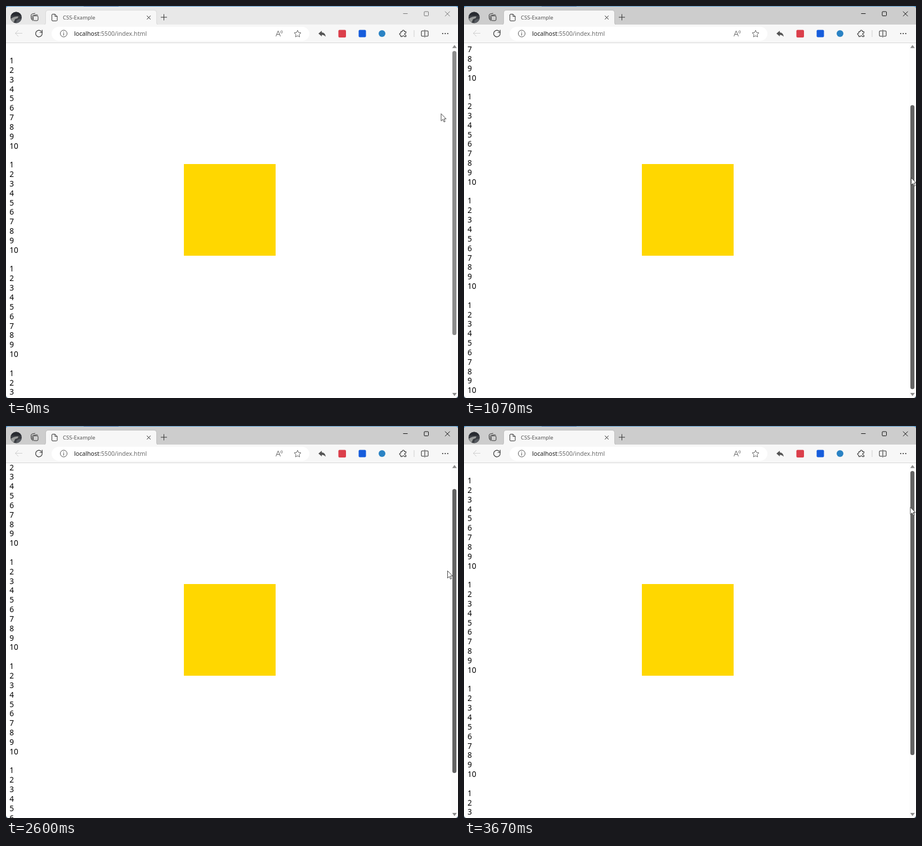
Recreate the animation shown at these times as an HTML page with a canvas. Size 803 by 697 pixels, loop 4.39 s.

```html
<!DOCTYPE html>
<html lang="en">
<head>
<meta charset="utf-8">
<title>Fixed square while scrolling</title>
<style>
  html, body { margin: 0; width: 100%; height: 100%; overflow: hidden; background: #fff; }
  canvas { display: block; width: 803px; height: 697px; }
</style>
</head>
<body>
<canvas id="stage" width="803" height="697"></canvas>
<script>
const ctx = document.getElementById('stage').getContext('2d');
const W = 803, H = 697, LOOP = 4390, STEP = 200 / 3;
const ACTIVE_STEP = 12, HOVER_STEP = 5;
const MAX_SCROLL = 121, THUMB_TRAVEL = 96.3;
const FONT = '"Noto Sans", "Open Sans", sans-serif';

// Each move eases to its goal with u ** power; times are in steps.
const pointerMoves = [
  { from: 0, to: 6, goal: [795.5, 202], power: 1 },
  { from: 11, to: 16, goal: [794, 305], power: 1 },
  { from: 16, to: 20, goal: [796, 310], power: 1 },
  { from: 21, to: 25, goal: [797, 253], power: 1.2 },
  { from: 25, to: 29, goal: [795, 146], power: 1 },
  { from: 29, to: 32, goal: [795, 140], power: 1 },
  { from: 36, to: 39, goal: [784, 257], power: 1 },
  { from: 39, to: 44, goal: [793, 313], power: 0.8 },
  { from: 46, to: 54, goal: [792.5, 144], power: 1.75 }
];
const scrollMoves = [
  { from: 12, to: 16, goal: [MAX_SCROLL], power: 0.7 },
  { from: 21.6, to: 28, goal: [0], power: 1.5 },
  { from: 37, to: 43, goal: [MAX_SCROLL], power: 1 },
  { from: 48, to: 53.5, goal: [0], power: 2 }
];

function follow(moves, origin, step) {
  return moves.reduce((pos, { from, to, goal, power }) => {
    const u = Math.min(1, Math.max(0, (step - from) / (to - from))) ** power;
    return pos.map((v, i) => v + (goal[i] - v) * u);
  }, origin);
}

function rect(x, y, w, h, fill) {
  ctx.fillStyle = fill;
  ctx.fillRect(x, y, w, h);
}

function round(x, y, w, h, r, fill, stroke, width = 1) {
  ctx.beginPath();
  ctx.roundRect(x, y, w, h, r);
  paint(fill, stroke, width);
}

function circle(x, y, r, fill, stroke, width = 1) {
  ctx.beginPath();
  ctx.arc(x, y, r, 0, Math.PI * 2);
  paint(fill, stroke, width);
}

function paint(fill, stroke, width) {
  if (fill) { ctx.fillStyle = fill; ctx.fill(); }
  if (stroke) { ctx.strokeStyle = stroke; ctx.lineWidth = width; ctx.stroke(); }
}

function shape(d, x, y, fill, stroke, width = 1) {
  ctx.save();
  ctx.translate(x, y);
  const path = new Path2D(d);
  ctx.lineJoin = 'round';
  ctx.lineWidth = width;
  if (fill) { ctx.fillStyle = fill; ctx.fill(path); }
  if (stroke) { ctx.strokeStyle = stroke; ctx.stroke(path); }
  ctx.restore();
}

function text(str, x, y, size, fill) {
  ctx.font = `${size}px ${FONT}`;
  ctx.fillStyle = fill;
  ctx.fillText(str, x, y);
  return x + ctx.measureText(str).width;
}

function drawAvatar() {
  ctx.save();
  circle(18, 20.5, 10, '#3a3d42');
  ctx.clip();
  rect(8, 10, 20, 7, '#282b31');
  shape('M-9 2Q-4 -2 4 -2L3 1L-2 3L-4 8H-7Z', 18, 20.5, '#9a9c9b');
  shape('M1 5Q5 1 10 3V10H0Z', 18, 20.5, '#565a60');
  ctx.restore();
}

function drawTitleBar(active) {
  const ink = active ? '#111' : '#777';
  rect(0, 1, W, 33, active ? '#cdcdcd' : '#e8e8e8');
  drawAvatar();

  // Stacked tabs
  round(48.5, 17.5, 8.5, 8.5, 2, null, '#333');
  shape('M2 11L0.8 9.5V3.5Q0.8 1.5 2.5 1L9 0Q10 0 10.8 1M-0.2 8.5L-1.2 6V1.5Q-1.2 -1 1 -1.5L6 -2.5',
    45.8, 15.5, null, '#333');

  ctx.shadowColor = 'rgba(0,0,0,.18)';
  ctx.shadowBlur = 2;
  shape('M66 34Q71 34 71 29V12Q71 8 75 8H263Q267 8 267 12V29Q267 34 272 34Z', 0, 0, '#f7f7f7');
  ctx.shadowColor = 'transparent';

  shape('M0 1.5Q0 0 1.5 0H5.5L9.5 4V10.5Q9.5 12 8 12H1.5Q0 12 0 10.5ZM5.5 0V4H9.5',
    81.5, 14.5, null, '#333');
  text('CSS-Example', 101, 24, 9.5, '#555');
  shape('M0 0L6.5 6.5M6.5 0L0 6.5', 250.3, 17.3, null, '#222');
  shape('M0 5.5H11M5.5 0V11', 275, 14.5, null, '#333');

  shape('M0 0H8', 705.5, 13.5, null, ink);
  round(743, 10, 7.5, 7.5, 1, null, ink);
  shape('M0 0L8.5 8.5M8.5 0L0 8.5', 780, 9.7, null, ink);
}

function drawAddressBar() {
  round(81, 37, 458, 25, 12.5, '#fff');
  circle(102.5, 49, 6, null, '#555');
  rect(102, 48, 1, 4.5, '#555');
  rect(102, 45.7, 1, 1.3, '#555');
  const x = text('localhost', 121, 53, 10.64, '#1b1b1b');
  text(':5500/index.html', x, 53, 10.64, '#6c6c6c');

  // Read aloud and favourite
  shape('M0 10.5L4 0.5L8 10.5M1.4 7H6.6', 479.5, 43.5, null, '#666');
  shape('M0 1.5Q1.7 3 0 4.8M2 0Q5 3 2 6.2', 487.5, 43, null, '#666', 0.9);
  shape('M0 -6L1.8 -2L6 -1.5L2.9 1.5L3.7 5.8L0 3.7L-3.7 5.8L-2.9 1.5L-6 -1.5L-1.8 -2Z',
    518, 49.2, null, '#666');
}

function drawToolbar() {
  rect(0, 33, W, 32, '#f7f7f7');
  rect(0, 65, W, 1, '#d6d6d6');

  // Back and reload
  shape('M13 5.5H0.5M6 0L0.5 5.5L6 11', 16, 43, null, '#cfcfcf');
  ctx.beginPath();
  ctx.arc(58.5, 49, 5.8, -0.5, Math.PI * 1.78);
  paint(null, '#333', 1.2);
  shape('M4.5 0V4.5H0', 59.7, 42.5, null, '#333', 1.2);

  drawAddressBar();

  // Extensions
  shape('M0 5L6 0V3Q12 3 13 10.5Q10 7.3 6 7.3V10Z', 555, 44, '#555');
  round(590.5, 42.5, 13.5, 13.5, 2, '#db3f4b');
  round(626.5, 42.5, 13, 13, 2, '#175ddc');
  circle(668, 49, 6, '#2b83c4');
  shape('M1.5 2.5H4Q3.6 0 5.8 0Q8 0 7.6 2.5H10.5V5.2Q8.2 5 8.2 7Q8.2 9 10.5 8.7V11.5H7.6Q7.5 9.7 5.8 9.7Q4.1 9.7 4 11.5H1.5V8.7Q-0.8 9 -0.8 7Q-0.8 5 1.5 5.2Z',
    700, 43, null, '#333', 1.1);
  rect(724.5, 43, 1, 12, '#d0d0d0');

  // Split screen and menu
  shape('M5 0H1.5Q0 0 0 1.5V8Q0 9.5 1.5 9.5H5M7 0H10.5Q12 0 12 1.5V8Q12 9.5 10.5 9.5H7M6 -2V11.5',
    738, 44.3, null, '#333', 1.1);
  for (let i = 0; i < 3; i++) circle(775.8 + i * 4.5, 49, 1.05, '#222');
}

function drawPage(offset) {
  rect(0, 66, W, H - 66, '#fff');
  for (let group = 0; group < 4; group++) {
    for (let n = 1; n <= 10; n++) {
      text(n, 6.2, 102 + (group * 11 + n - 1) * 16.84 - offset, 13.6, '#000');
    }
  }
  rect(316, 281, 163, 163, '#ffd700');
}

function drawScrollbar(offset, hover) {
  rect(791, 66, 12, H - 66, '#fcfcfc');
  shape('M0 6L4 0.5L8 6Z', 792.8, 68.7, '#8b8b8b');
  shape('M0 0L4 5.5L8 0Z', 792.8, 688, '#8b8b8b');
  const y = 80 + offset / MAX_SCROLL * THUMB_TRAVEL;
  round(793, y, 7.2, 505, 3.6, hover ? '#636363' : '#8b8b8b');
}

function drawDesktopEdge() {
  rect(0, 0, W, 1, '#4a90c8');
  rect(138, 0, 62, 1, '#2467b0');
  shape('M0 1H4Q0 1 0 5Z', 0, 0, '#4a90c8');
  shape('M0 1H-4Q0 1 0 5Z', W, 0, '#4a90c8');
  shape('M0 0H5Q0 0 0 -5Z', 0, H, '#243c50');
  shape('M0 0H-5Q0 0 0 -5Z', W, H, '#243c50');
}

function drawPointer(x, y) {
  shape('M0.5 0.5V13.4L3.5 10.6L5.6 15.2L7.6 14.3L5.5 9.8H9.5Z', x, y, '#fff', '#333', 0.9);
}

function draw(t) {
  // The small lead makes steps start on times rounded to 10 ms.
  const step = Math.floor((t + 4) / STEP);
  const [offset] = follow(scrollMoves, [0], step);
  const [x, y] = follow(pointerMoves, [772.5, 191], step);
  drawPage(offset);
  drawTitleBar(step >= ACTIVE_STEP);
  drawToolbar();
  drawScrollbar(offset, step >= HOVER_STEP);
  drawDesktopEdge();
  drawPointer(x, y);
}

const start = performance.now();
function tick() {
  draw((performance.now() - start) % LOOP);
  requestAnimationFrame(tick);
}
tick();
</script>
</body>
</html>
```
